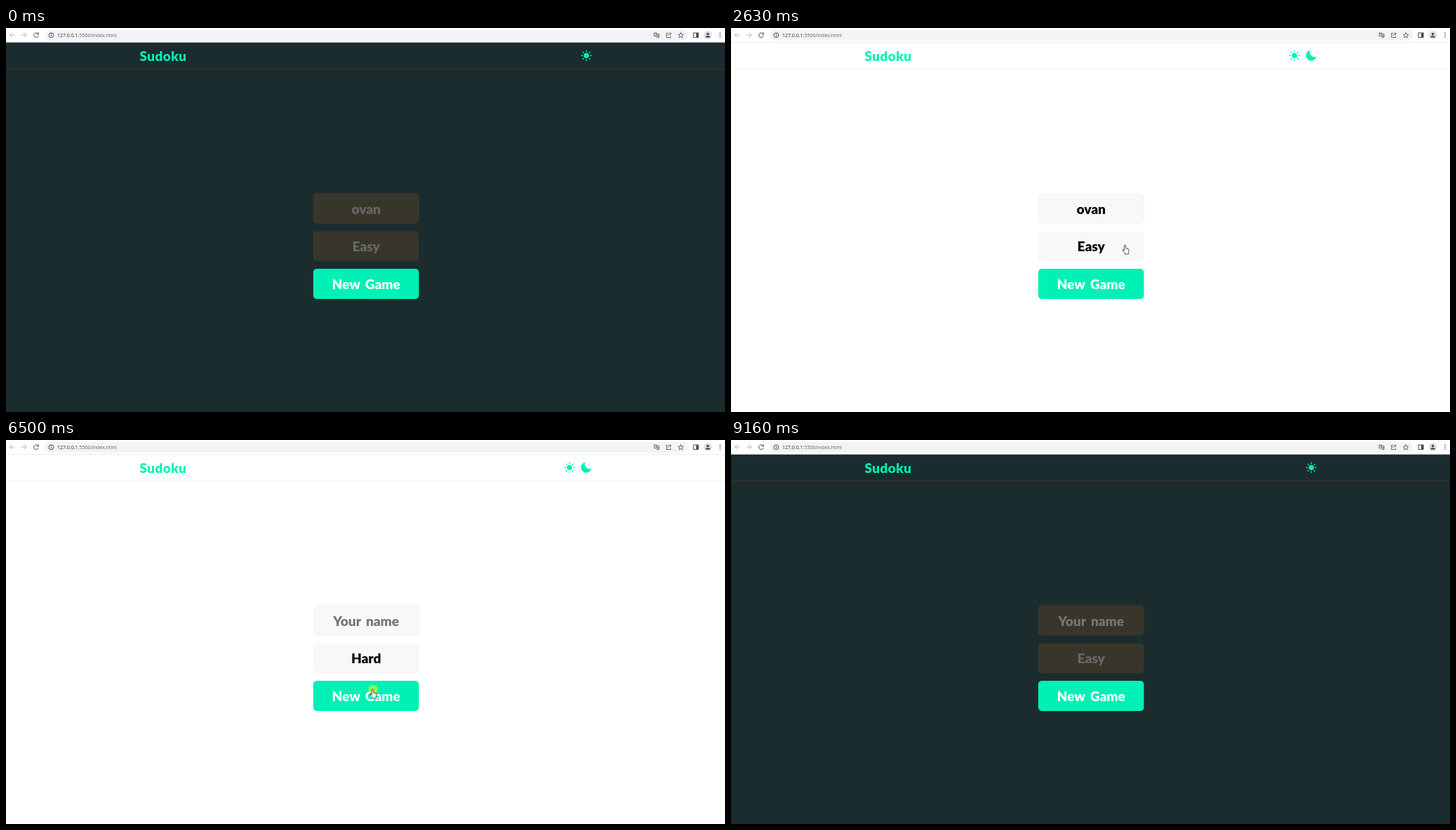
These frames come from a looping animation (1025x547 px, 9.54 s). An HTML page:

```html
<!DOCTYPE html>
<html lang="en">
<head>
<meta charset="utf-8">
<title>Sudoku</title>
<style>
  html, body { margin: 0; width: 100%; height: 100%; overflow: hidden; }
  svg { display: block; width: 1025px; height: 547px; }
  #page { --bg: #1b2c2e; --field: #38362b; --text: #686868; --hint: #757575; --line: #443522; --accent: #00f1b5; }
  #page.light { --bg: #fff; --field: #f8f8f6; --text: #000; --line: #f4f4f4; }
  #page text { font: 900 19px Lato, sans-serif; word-spacing: 3px; }
  #page .title { letter-spacing: .4px; }
  .mid { text-anchor: middle; }
  .bg { fill: var(--bg); }
  .field { fill: var(--field); }
  .text { fill: var(--text); }
  .accent { fill: var(--accent); }
  #rays { stroke: var(--accent); stroke-width: 1.5; }
  #bar text { font: 7px "Open Sans", sans-serif; }
  .ico { fill: none; stroke: #46494d; stroke-width: 1; }
</style>
</head>
<body>
<svg viewBox="0 0 1025 547">
  <g id="page">
    <rect class="bg" width="1025" height="547"/>
    <rect y="58" width="1025" height="1" fill="var(--line)"/>
    <text class="accent title" x="190.5" y="47">Sudoku</text>
    <g id="sun">
      <circle class="accent" r="3.75"/>
      <g id="rays"></g>
    </g>
    <path id="moon" class="accent" transform="translate(818.2 30.3) scale(.75)" d="M10 2A10 10 0 1 0 21.8 13.8A9 9 0 0 1 10 2Z"/>

    <g id="nameBox">
      <rect id="field" class="field" x="438.5" y="236" width="149.8" height="42" rx="5" stroke-width="1.4"/>
      <rect id="selection" y="246" height="23" fill="#3390ff"/>
      <text id="name" class="mid" x="513.4" y="264.5"></text>
      <rect id="caret" x="513" y="244" width="1" height="25" fill="#222"/>
    </g>
    <rect class="field" x="438" y="289.4" width="150.6" height="42.8" rx="5"/>
    <text id="level" class="mid text" x="513.4" y="318.3"></text>
    <rect class="accent" x="438" y="343" width="150.6" height="43" rx="5"/>
    <text class="mid" x="513.4" y="372.3" fill="#fff">New Game</text>
  </g>

  <g id="bar">
    <rect width="1025" height="20" fill="#fff"/>
    <rect y="20" width="1025" height=".7" fill="#e3e5e7"/>
    <rect x="55" y="2.8" width="917" height="15" rx="7.5" fill="#f1f3f4"/>
    <g class="ico">
      <path stroke="#b4b6b8" d="M12.5 10H5.5M8.8 6.6L5.4 10l3.4 3.4M22 10h7M25.7 6.6L29.1 10l-3.4 3.4"/>
      <path d="M45.5 8A3.3 3.3 0 1 0 46.2 11M46.4 6.3V9H43.6"/>
      <circle cx="64.5" cy="10.3" r="3.4"/>
      <path d="M64.5 9.7v2.4M64.5 8v.9"/>
      <path stroke-width=".8" d="M924 7h3.6v4.6H924zM925 9h1.8M928 8.4h3v5h-3.6M928.5 11h2M929.5 10v2.4"/>
      <path stroke-width=".8" d="M944 7.5h-2.5v6h6v-2M943.5 11.3c.3-2.3 1.6-3.2 4-3.2M946 6.2l2.4 2-2.4 2"/>
      <path stroke-width=".8" d="M962 6.5l1.1 2.5 2.7.3-2 1.8.6 2.7-2.4-1.4-2.4 1.4.6-2.7-2-1.8 2.7-.3z"/>
      <rect x="980" y="7" width="7" height="6.4"/>
    </g>
    <g fill="#46494d">
      <rect x="984" y="7" width="3" height="6.4"/>
      <circle cx="1000.5" cy="10" r="6" fill="#dfe1e5"/>
      <circle cx="1000.5" cy="8.5" r="1.8"/>
      <path d="M997 13.6q0-2.6 3.5-2.6t3.5 2.6z"/>
      <circle cx="1018" cy="7.4" r=".8"/><circle cx="1018" cy="10.2" r=".8"/><circle cx="1018" cy="13" r=".8"/>
    </g>
    <text x="73" y="12.9" fill="#2b2d30">127.0.0.1<tspan fill="#5f6368">:5500/index.html</tspan></text>
  </g>

  <g id="mouse" stroke-width=".8" stroke="#222" fill="#fff" stroke-linejoin="round">
    <circle id="press" cx=".2" cy=".4" r="6.6" fill="#ff0" fill-opacity=".6" stroke="none"/>
    <path id="pointer"/>
  </g>
</svg>
<script>
const LOOP = 9540;
const $ = id => document.getElementById(id);
const within = (t, spans) => spans.some(([a, b]) => t >= a && t < b);
const show = (el, on) => el.setAttribute('visibility', on ? 'inherit' : 'hidden');

const POINTERS = {
  arrow: 'M0 0V10.5L2.4 8.3L4 12L5.6 11.3L4 7.8H7.3Z',
  hand: 'M-1.3 1Q-1.3 0-.2 0Q.9 0 .9 1V5L4 5.7Q5.3 6 5.3 7.3L4.6 10.5V13H-.6V11.5L-3.8 7.6Q-4.2 6.6-3.2 6.4L-1.3 7.8Z',
  beam: 'M-2-5H2M0-5V5M-2 5H2'
};

const smooth = p => p * p * (3 - 2 * p);
const easeOut = p => p * (2 - p);
const easeIn = p => p * p;

// start, end, target x, target y, easing, bend
const ENTRY = [989, 516];
const MOVES = [
  [70, 600, 826, 38, easeOut],
  [760, 860, 835, 38],
  [890, 970, 839, 38],
  [1210, 1840, 544, 190],
  [2070, 2330, 764, 67],
  [2330, 2630, 562, 309],
  [3370, 3410, 562, 311],
  [3700, 3930, 545, 255],
  [3960, 4260, 467, 253],
  [4630, 4950, 516, 320],
  [5090, 5220, 523, 355],
  [7120, 7370, 482, 319],
  [7480, 8050, 874, 74],
  [8070, 8320, 825, 36],
  [8570, 9160, 997, 556, easeIn, [777, 220]]
];
const PRESSES = [[760, 855], [3060, 3170], [3610, 3700], [3940, 4430],
  [5660, 5760], [6500, 6600], [7390, 7460], [8335, 8430]];
const FOCUS = [[3940, 5660], [6260, 6500], [7100, 7390]];
const CARET = [[4980, 5520], [6260, 6500], [7100, 7390]];
const SHAKES = [5760, 6600];

function mouseAt(t) {
  let [x, y] = ENTRY;
  for (const [a, b, ex, ey, ease = smooth, bend] of MOVES) {
    if (t < a) break;
    const u = ease(Math.min(1, (t - a) / (b - a))), v = 1 - u;
    const [bx, by] = bend || [(x + ex) / 2, (y + ey) / 2];
    x = v * v * x + 2 * u * v * bx + u * u * ex;
    y = v * v * y + 2 * u * v * by + u * u * ey;
    if (t < b) break;
  }
  return [x, y];
}

function pointerKind(x, y, light) {
  const onIcon = cx => Math.hypot(x - cx, y - 39) < 10;
  if (onIcon(827) || light && onIcon(803)) return 'hand';
  if (x < 438 || x > 589) return 'arrow';
  if (y > 235 && y < 278) return 'beam';
  return y > 289 && y < 332 || y > 343 && y < 386 ? 'hand' : 'arrow';
}

function shakeOffset(t) {
  const start = SHAKES.find(s => t >= s && t < s + 500);
  return start === undefined ? 0 : 12.5 * Math.sin((t - start) / 500 * 2 * Math.PI);
}

function draw(t) {
  const light = t >= 855 && t < 8430;
  const named = t < 4980;
  const focused = within(t, FOCUS);
  const [x, y] = mouseAt(t);

  $('page').classList.toggle('light', light);
  $('sun').setAttribute('transform', `translate(${light ? 803.3 : 827.3} 39.3)`);
  show($('moon'), light);

  const selecting = t >= 3960 && named;
  const from = Math.max(492, Math.min(535, t < 4260 ? x : 492));
  $('selection').setAttribute('x', from);
  $('selection').setAttribute('width', selecting ? 535 - from : 0);
  $('nameBox').setAttribute('transform', `translate(${shakeOffset(t)})`);
  $('field').setAttribute('stroke', focused ? 'var(--accent)' : light ? '#f5f5f3' : 'var(--field)');
  $('name').textContent = named ? 'ovan' : 'Your name';
  $('name').style.fill = selecting && from < 500 ? '#fff' : named ? 'var(--text)' : 'var(--hint)';
  $('level').textContent = t < 3110 || t >= 7460 ? 'Easy' : t < 3680 ? 'Medium' : 'Hard';
  show($('caret'), within(t, CARET));

  show($('mouse'), t >= 70 && t < 9160);
  $('mouse').setAttribute('transform', `translate(${x} ${y})`);
  $('pointer').setAttribute('d', POINTERS[pointerKind(x, y, light)]);
  show($('press'), within(t, PRESSES));
}

$('rays').innerHTML = Array.from({ length: 8 }, (_, i) =>
  `<path d="M5.25 0H7.5" transform="rotate(${i * 45})"/>`).join('');

const begin = performance.now();
function tick() {
  draw((performance.now() - begin) % LOOP);
  requestAnimationFrame(tick);
}
tick();
</script>
</body>
</html>
```
